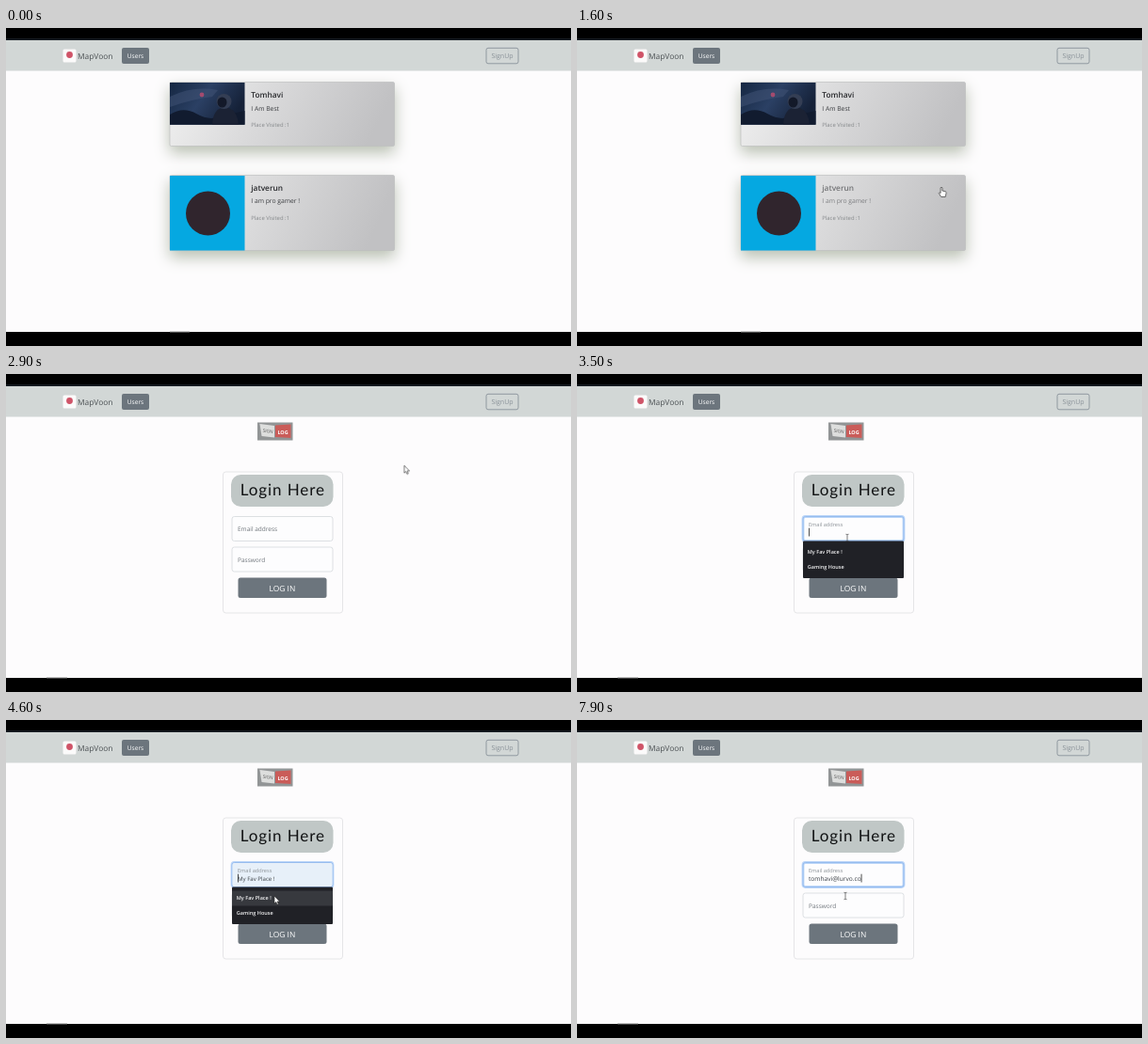
Animation, 600 px wide and 338 px high, one loop 8 s. Source, as an HTML page:

```html
<!DOCTYPE html>
<html lang="en">
<head>
<meta charset="utf-8">
<title>Sign-in walkthrough</title>
<style>
html, body { margin: 0; width: 100%; height: 100%; overflow: hidden; background: #000; }
svg { display: block; width: 100%; height: 100%; }
text { font-family: "Open Sans", "Noto Sans", sans-serif; text-rendering: geometricPrecision; white-space: pre; }
.title { font-size: 8.3px; font-weight: 600; fill: #27282b; }
.bio { font-size: 6.75px; fill: #3b3d40; }
.visits { font-size: 5.9px; fill: #85888b; }
.field { fill: #fdfdfe; stroke: #d5d8dc; stroke-width: .8; }
.hint { font-size: 6.5px; fill: #6f757b; }
.value { font-size: 6.6px; fill: #3b4046; }
.item { font-size: 5.5px; font-weight: 600; fill: #f4f4f5; }
.mid { text-anchor: middle; }
.heading { font: 17px Lato, sans-serif; letter-spacing: .9px; fill: #101213; }
.card { filter: drop-shadow(0 7px 8px #b9c0b2); }

/* 1% of the loop is 80 ms */
.users, .login, .over, .focus, .blank, .list, .pick, .arrow, .hand, .beam { animation: 8s step-end infinite; }
.users { animation-name: users; }
.login { animation-name: login; }
.over { animation-name: over; }
.focus { animation-name: focus; }
.blank { animation-name: blank; }
.list { animation-name: list; }
.pick { animation-name: pick; }
.arrow { animation-name: arrow; }
.hand { animation-name: hand; }
.beam { animation-name: beam; }
.dim { animation: dim 8s linear infinite; }
.pointer { animation: travel 8s ease-in-out infinite; }

@keyframes users { 0% { visibility: visible } 26.25%, 100% { visibility: hidden } }
@keyframes login { 0% { visibility: hidden } 26.25%, 100% { visibility: visible } }
@keyframes over { 0%, 35%, 100% { visibility: hidden } 25% { visibility: visible } }
@keyframes focus { 0% { visibility: hidden } 41.25%, 100% { visibility: visible } }
@keyframes blank { 0%, 41.25%, 100% { visibility: hidden } 26.25% { visibility: visible } }
@keyframes list { 0%, 60%, 100% { visibility: hidden } 42.5% { visibility: visible } }
@keyframes pick { 0%, 60%, 100% { visibility: hidden } 52.5% { visibility: visible } }
@keyframes arrow {
  0%, 11.25%, 23.75%, 38.75%, 60%, 100% { visibility: hidden }
  2.5%, 21.25%, 35%, 47.5% { visibility: visible }
}
@keyframes hand { 0%, 21.25%, 35%, 100% { visibility: hidden } 11.25%, 23.75% { visibility: visible } }
@keyframes beam { 0%, 47.5% { visibility: hidden } 38.75%, 60%, 100% { visibility: visible } }
@keyframes dim { 0%, 10%, 23%, 100% { opacity: 1 } 13%, 21% { opacity: .58 } }
@keyframes travel {
  0%, 2.5% { transform: translate(416px, 309px) }
  11.25% { transform: translate(393px, 200px) }
  17.5%, 20% { transform: translate(387px, 169px) }
  22.5% { transform: translate(559px, 56px) }
  25%, 33.75% { transform: translate(540px, 31px) }
  39%, 47.5% { transform: translate(287px, 174px) }
  52.5%, 100% { transform: translate(285px, 187px) }
}
</style>
</head>
<body>
<svg viewBox="0 0 600 338" preserveAspectRatio="none">
  <defs>
    <linearGradient id="silver" x2="1" y2=".15">
      <stop offset="0" stop-color="#f1f1f1"/>
      <stop offset=".45" stop-color="#dadadb"/>
      <stop offset="1" stop-color="#c1c1c3"/>
    </linearGradient>
    <linearGradient id="night" x2="1" y2=".4">
      <stop offset="0" stop-color="#152742"/>
      <stop offset=".5" stop-color="#2b4064"/>
      <stop offset="1" stop-color="#152138"/>
    </linearGradient>
  </defs>

  <rect width="600" height="338"/>
  <rect y="11" width="600" height="2" fill="#14181e"/>
  <rect y="13" width="600" height="310" fill="#fdfcfd"/>
  <rect y="13" width="600" height="32.5" fill="#d2d7d6"/>

  <rect x="60.5" y="22.5" width="14" height="14" rx="1.5" fill="#fbfafa"/>
  <circle cx="67.5" cy="28.5" r="3.4" fill="#cf5468"/>
  <text x="76" y="32.7" font-size="8.4" fill="#4c5154">MapVoon</text>
  <rect x="123" y="21" width="29" height="17" rx="2" fill="#6c757d"/>
  <text class="mid" x="137.5" y="32" font-size="6.6" fill="#fff">Users</text>
  <rect x="510" y="21.3" width="34" height="16.5" rx="2" fill="none" stroke="#89929a" stroke-width=".9"/>
  <text class="mid" x="527" y="32" font-size="7" fill="#899198">SignUp</text>
  <g class="over">
    <rect x="509.6" y="21" width="34.8" height="17" rx="2" fill="#6c757d"/>
    <text class="mid" x="527" y="32" font-size="7" fill="#fff">SignUp</text>
  </g>

  <g class="users">
    <rect x="174" y="322.6" width="21" height="1" fill="#777"/>
    <rect class="card" x="174" y="57.5" width="238.5" height="68" rx="1.5" fill="url(#silver)" stroke="#bfc1c1" stroke-width=".7"/>
    <rect x="174" y="58" width="79.5" height="44.7" fill="url(#night)"/>
    <path d="M174 92Q188 83 202 91T227 94L253.500 88V102.700H174Z" fill="#111b2f"/>
    <path d="M174 73Q199 61 225 66L219 73Q196 76 174 84Z" fill="#405275" opacity=".55"/>
    <circle cx="208" cy="71" r="2.4" fill="#a34b6f"/>
    <path d="M219 102.700Q220 87 229 85H237Q246 89 247 102.700Z" fill="#1b2234"/>
    <circle cx="231.500" cy="78" r="8" fill="#343e54"/>
    <ellipse cx="229.500" cy="79" rx="5" ry="5.500" fill="#131929"/>
    <text class="title" x="260.300" y="74">Tomhavi</text>
    <text class="bio" x="260.300" y="87.500">I Am Best</text>
    <text class="visits" x="260.300" y="105">Place Visited :1</text>

    <rect class="card" x="174" y="156.500" width="238.500" height="80" rx="1.500" fill="url(#silver)" stroke="#bfc1c1" stroke-width=".7"/>
    <rect x="174" y="157" width="79.500" height="79.500" fill="#05a8e1"/>
    <circle cx="214.500" cy="197" r="23.500" fill="#30252d"/>
    <g class="dim">
      <text class="title" x="260.300" y="173">jatverun</text>
      <text class="bio" x="260.300" y="186.300">I am pro gamer !</text>
    </g>
    <text class="visits" x="260.300" y="204">Place Visited :1</text>
  </g>

  <g class="login">
    <rect x="43" y="322.600" width="22" height="1" fill="#666"/>
    <rect x="267" y="51.500" width="37.500" height="19" fill="#929596"/>
    <path d="M269.500 53L285 55V67.500L271.500 66Z" fill="#dddedd"/>
    <text x="272.500" y="61.500" font-size="4.800" fill="#555" transform="rotate(8 272 61)">SIGN</text>
    <path d="M286 54.500L302.500 53.500V68L286 67Z" fill="#ca5c59"/>
    <text class="mid" x="294" y="63.500" font-size="5.400" font-weight="700" fill="#fff">LOG</text>

    <rect x="230.500" y="104" width="127" height="150" rx="3" fill="none" stroke="#e2e2e5" stroke-width=".9"/>
    <rect x="239" y="107" width="108.500" height="34" rx="10.500" fill="#c0c7c6"/>
    <text class="heading" x="248.800" y="129">Login Here</text>
    <rect class="field" x="240" y="151.500" width="107" height="26" rx="2.500"/>
    <rect class="field" x="240" y="184" width="107" height="26" rx="2.500"/>
    <text class="hint" x="246" y="200">Password</text>
    <rect x="246.500" y="216.500" width="94" height="21.500" rx="2.500" fill="#6c757d"/>
    <text class="mid" x="293.400" y="230.600" font-size="8.400" fill="#fff">LOG IN</text>
  </g>
  <text class="hint blank" x="246" y="167">Email address</text>

  <g class="focus">
    <rect x="240" y="151.500" width="107" height="26" rx="2.500" fill="#fdfdfe" stroke="#bcd6f8" stroke-width="2.800"/>
    <rect x="240" y="151.500" width="107" height="26" rx="2.500" fill="none" stroke="#8db7ec" stroke-width=".8"/>
  </g>
  <rect class="pick" x="240.400" y="152" width="106.200" height="25" rx="2" fill="#e7f0f9"/>
  <text class="focus" x="246" y="162" font-size="5.600" fill="#8b9197">Email address</text>
  <text class="pick" x="246" y="171" font-size="6.100" fill="#3b4046">My Fav Place !</text>
  <text class="value" id="typed" x="246" y="170.800"></text>
  <rect id="caret" y="163.700" width=".8" height="8.800" fill="#222"/>

  <g class="list">
    <rect x="240" y="177.500" width="107" height="39.500" rx="1" fill="#202126"/>
    <rect class="pick" x="240" y="181.500" width="107" height="16" fill="#37393e"/>
    <text class="item" x="244.800" y="191.400">My Fav Place !</text>
    <text class="item" x="244.800" y="207.400">Gaming House</text>
  </g>

  <g class="over">
    <rect y="314" width="200" height="9.500" fill="#08090a"/>
    <text x="2" y="320.300" font-size="5.100" font-weight="600" fill="#f2f2f2">https://mapvoon-2b3e8.web.app/auth</text>
  </g>

  <g class="pointer">
    <path class="arrow" d="M0 0V8L1.800 6.400L3 9.200L4.300 8.600L3.100 5.900H5.600Z" fill="#fff" stroke="#222" stroke-width=".6"/>
    <path class="hand" d="M-.900 .800Q0 -.500 .900 .800V4L4.300 4.800Q5.300 5.200 5 6.600L4.200 10.500H-.300L-2.800 6.500Q-2.600 5.200 -.900 6.500Z" fill="#fff" stroke="#333" stroke-width=".7"/>
    <path class="beam" d="M-1.500 -3.700Q0 -3.700 0 -3V3Q0 3.700 -1.500 3.700M1.500 -3.700Q0 -3.700 0 -3M0 3Q0 3.700 1.500 3.700" fill="none" stroke="#444" stroke-width=".7"/>
  </g>
</svg>
<script>
const LOOP = 8000, BLINK = 530, FOCUS = 3300;
const email = "tomhavi@lurvo.co";
const keyTimes = [4800, 4910, 5020, 5130, 5240, 5350, 5460, 6150, 6380,
                  6560, 6660, 6860, 6980, 7720, 7780, 7880];
const typed = document.getElementById("typed");
const caret = document.getElementById("caret");
let start;

function draw(now) {
  start ??= now;
  const t = (now - start) % LOOP;
  const count = keyTimes.filter(k => k <= t).length;
  const lastInput = count ? keyTimes[count - 1] : FOCUS;
  const lit = t >= FOCUS && (t - lastInput) % (2 * BLINK) < BLINK;

  typed.textContent = email.slice(0, count);
  caret.setAttribute("x", 246 + (count ? typed.getComputedTextLength() : 0));
  caret.setAttribute("visibility", lit ? "visible" : "hidden");
  requestAnimationFrame(draw);
}
requestAnimationFrame(draw);
</script>
</body>
</html>
```
